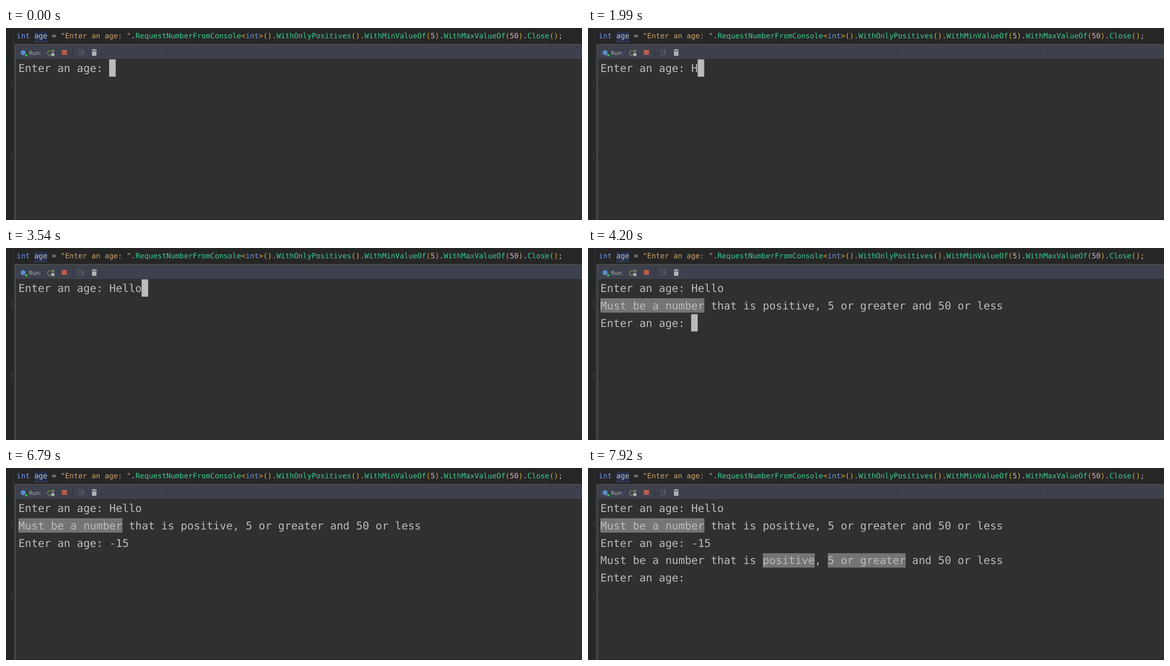
An HTML page for the animation above (8000 ms loop, 1280 px wide and 428 px high).

```html
<!DOCTYPE html>
<html lang="en">
<head>
<meta charset="utf-8">
<title>Console input</title>
<style>
  html, body { margin: 0; width: 100%; height: 100%; overflow: hidden; background: #262626; }
  svg { display: block; width: 1280px; height: 428px; }
  text { white-space: pre; text-rendering: geometricPrecision; }
  .code, .out { font-family: "DejaVu Sans Mono", "Noto Sans Mono", monospace; font-variant-ligatures: none; }
  .code { font-size: 16.26px; fill: #bdbdbd; }
  .out { font-size: 23.97px; fill: #bbb; }
  .key { fill: #6c95eb; }
  .str { fill: #c9a26d; }
  .fn { fill: #39cc8f; }
  .br { fill: #d9a936; }
  .num { fill: #d0b4bf; }
  .label { font: 12.5px "Open Sans", "Noto Sans", sans-serif; fill: #bbb; }

  /* --c is the advance of one console character */
  .caret { --c: 14.43px; animation: move 8s step-end infinite; }
  .block { animation: blink 8s step-end infinite; }
  .reply1 { animation: reply1 8s step-end infinite; }
  .reply2 { animation: reply2 8s step-end infinite; }

  @keyframes move {
    0% { transform: translate(0, 0); }
    24.875% { transform: translate(var(--c), 0); }
    32.375% { transform: translate(calc(2 * var(--c)), 0); }
    36.5% { transform: translate(calc(3 * var(--c)), 0); }
    39.875% { transform: translate(calc(4 * var(--c)), 0); }
    44.25% { transform: translate(calc(5 * var(--c)), 0); }
    52.5% { transform: translate(0, 77.5px); }
    70.625% { transform: translate(var(--c), 77.5px); }
    73.875% { transform: translate(calc(2 * var(--c)), 77.5px); }
    78.25% { transform: translate(calc(3 * var(--c)), 77.5px); }
    85.75%, 100% { transform: translate(0, 155px); }
  }
  @keyframes blink {
    0%, 10.75%, 24%, 32.375%, 52.5%, 64.875%, 85.75% { opacity: 1; }
    4.125%, 17.375%, 31.5%, 51.625%, 58.25%, 84.875%, 99%, 100% { opacity: 0; }
  }
  @keyframes reply1 {
    0% { opacity: 0; }
    52.5%, 100% { opacity: 1; }
  }
  @keyframes reply2 {
    0% { opacity: 0; }
    85.75%, 100% { opacity: 1; }
  }
</style>
</head>
<body>
<svg viewBox="0 0 1280 428" xmlns="http://www.w3.org/2000/svg">
  <!-- editor -->
  <rect width="1280" height="428" fill="#262626"/>
  <rect y="58" width="16" height="26" fill="#202725"/>
  <path d="M16.5 0V428M1197.5 0V36" stroke="#3b3b3b"/>
  <g fill="#262626" stroke="#494949">
    <path d="M11.5 119.5H20.5V128.5L16.5 132.5L11.5 127.5ZM13.5 125.5H20"/>
    <path d="M11.5 290.5H20.5V280L16.5 276.5L11.5 281.5ZM13.5 284.5H20"/>
  </g>
  <rect x="63" y="8" width="29" height="23" fill="#252e4b"/>
  <path d="M63 30.5H92" stroke="#4a5578"/>
  <text class="code" x="23.6" y="23"><tspan class="key">int</tspan> age = <tspan class="str">"Enter an age: "</tspan>.<tspan class="fn">RequestNumberFromConsole</tspan><tspan class="br">&lt;</tspan><tspan class="key">int</tspan><tspan class="br">&gt;()</tspan>.<tspan class="fn">WithOnlyPositives</tspan><tspan class="br">()</tspan>.<tspan class="fn">WithMinValueOf</tspan><tspan class="br">(</tspan><tspan class="num">5</tspan><tspan class="br">)</tspan>.<tspan class="fn">WithMaxValueOf</tspan><tspan class="br">(</tspan><tspan class="num">50</tspan><tspan class="br">)</tspan>.<tspan class="fn">Close</tspan><tspan class="br">()</tspan>;</text>

  <!-- run window -->
  <rect x="19" y="36" width="1261" height="392" fill="#303030"/>
  <rect x="22" y="39" width="1258" height="30" fill="#3d414d"/>
  <path d="M356.5 40V69M689.5 40V69M1022.5 40V69" stroke="#363943"/>
  <path d="M20.5 428V37H1280" fill="none" stroke="#505050" stroke-width="2.5"/>
  <path d="M22 427H1280" stroke="#292929" stroke-width="2"/>

  <!-- toolbar -->
  <circle cx="38" cy="55" r="5.5" fill="#5a8cc8"/>
  <circle cx="45" cy="61" r="2.5" fill="#2fd052"/>
  <text class="label" x="51" y="60">Run:</text>
  <path d="M99 61.2A5.3 5.3 0 1 1 100 51.3H104" fill="none" stroke="#6d8058" stroke-width="2"/>
  <path d="M103 46.5L108.5 51.3L103 56Z" fill="#6d8058"/>
  <rect x="100.5" y="56" width="7" height="6.5" fill="#aeb0b2"/>
  <rect x="124" y="49" width="11.5" height="11" fill="#b85d4a"/>
  <path d="M148.5 43V67" stroke="#2f323a"/>
  <g fill="none" stroke="#63666d" stroke-width="1.6">
    <path d="M160 49H166M160 53.5H166M160 59.5H174"/>
    <path d="M170.5 47V55.5M167 52.5L170.5 56L174 52.5"/>
  </g>
  <path d="M190 48.5H193.5V47H198.5V48.5H202V50.5H190ZM191 52H201V60.5Q201 62 199.5 62H192.5Q191 62 191 60.5Z" fill="#afb1b3"/>

  <!-- console -->
  <text class="out" x="27.6" y="98">Enter an age: Hello</text>
  <g class="reply1">
    <rect x="27.6" y="112" width="231" height="32" fill="#747674"/>
    <text class="out" x="27.6" y="137">Must be a number that is positive, 5 or greater and 50 or less</text>
    <text class="out" x="27.6" y="176">Enter an age: -15</text>
  </g>
  <g class="reply2">
    <rect x="388.5" y="190" width="115.5" height="32" fill="#747474"/>
    <rect x="532.8" y="190" width="173.2" height="32" fill="#747474"/>
    <text class="out" x="27.6" y="214">Must be a number that is positive, 5 or greater and 50 or less</text>
    <text class="out" x="27.6" y="253">Enter an age: </text>
  </g>
  <!-- the caret's trailing cover hides text not typed yet -->
  <g class="caret">
    <rect x="229.2" y="70" width="100" height="38.5" fill="#303030"/>
    <rect class="block" x="229.2" y="70" width="14.6" height="38.5" fill="#bbb"/>
  </g>
</svg>
</body>
</html>
```
